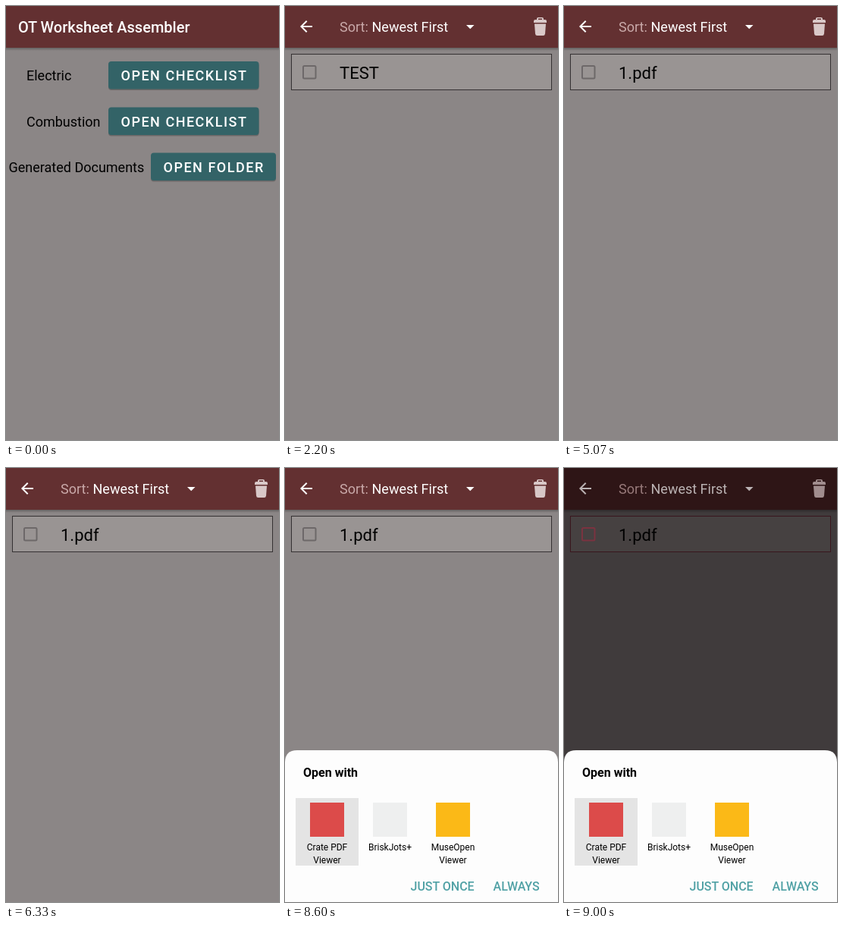
These frames come from a looping animation (360x572 px, 9.07 s). An HTML page:

```html
<!DOCTYPE html>
<html lang="en">
<head>
<meta charset="utf-8">
<title>Checklist app</title>
<style>
html, body { margin: 0; width: 100%; height: 100%; overflow: hidden; background: #8b8686; }
svg { display: block; width: 100vw; height: 100vh; font-family: Roboto, sans-serif; }

/* Every part shares one 9070 ms timeline. */
.anim { animation: 9070ms linear infinite; }
.main { animation-name: main; }
.files { animation-name: files; }
.first { animation-name: first; }
.second { animation-name: second; }
.press { animation-name: press; }
.tap { animation-name: tap; }
.row-tap { animation-name: row-tap; }
.tap, .row-tap { transform-box: fill-box; transform-origin: center; }
.scrim { animation-name: scrim; }
.light { animation-name: dim; }
.edge { stroke: var(--edge); animation-name: tint; }
.sheet { animation-name: rise; }

.title { font-size: 20px; font-weight: 500; fill: #fff; }
.label { font-size: 18px; }
.button { font-size: 18px; font-weight: 500; letter-spacing: 1.5px; fill: #fff; }
.file { font-size: 22px; }
.app { font-size: 12px; text-anchor: middle; }
.action { font-size: 16px; font-weight: 500; fill: #50a1a5; }

@keyframes main {
  0%, 15.44% { opacity: 1; }
  16.87%, 100% { opacity: 0; }
}
@keyframes files {
  0%, 15.44% { opacity: 0; }
  16.87%, 100% { opacity: 1; }
}
@keyframes first {
  0%, 52.15% { opacity: 1; }
  52.16%, 100% { opacity: 0; }
}
@keyframes second {
  0%, 52.15% { opacity: 0; }
  52.16%, 100% { opacity: 1; }
}
@keyframes press {
  0%, 11.03% { opacity: 0; }
  12.4%, 100% { opacity: .8; }
}
@keyframes tap {
  0%, 11.03% { transform: scale(0); opacity: 0; }
  11.5% { transform: scale(.2); opacity: .85; }
  13.23% { transform: scale(1); opacity: .85; }
  15.44% { transform: scale(2.4); opacity: .5; }
  16.87%, 100% { transform: scale(2.8); opacity: 0; }
}
@keyframes row-tap {
  0%, 48.51% { transform: scale(0); opacity: 0; }
  48.9% { transform: scale(.1); opacity: .16; }
  52.15% { transform: scale(1); opacity: .16; }
  55.13%, 91.18% { transform: scale(1); opacity: 0; }
  91.19% { transform: scale(0); opacity: .16; }
  93.38% { transform: scale(1); opacity: .16; }
  94.7%, 100% { transform: scale(1); opacity: 0; }
}
@keyframes scrim {
  0%, 94.82% { opacity: 0; }
  98.46%, 100% { opacity: .56; }
}
@keyframes dim {
  0%, 94.82% { opacity: 1; }
  98.46%, 100% { opacity: .68; }
}
@keyframes tint {
  0%, 94.82% { stroke: var(--edge); }
  98.46%, 100% { stroke: #7b3340; }
}
@keyframes rise {
  0%, 92.2% { transform: translateY(205px); animation-timing-function: cubic-bezier(0, 0, .2, 1); }
  94.6%, 100% { transform: translateY(0); }
}
</style>
</head>
<body>
<svg viewBox="0 0 360 572" preserveAspectRatio="none">
  <defs>
    <linearGradient id="shade" x2="0" y2="1">
      <stop stop-opacity=".28"/>
      <stop offset="1" stop-opacity="0"/>
    </linearGradient>
    <clipPath id="folderClip"><rect x="191" y="193.500" width="165" height="36.500" rx="4"/></clipPath>
    <clipPath id="rowClip"><rect x="9" y="64" width="342" height="46"/></clipPath>
    <g id="openList">
      <rect x="135" y="74.500" width="198.500" height="36.500" rx="4" opacity=".22"/>
      <rect x="135" y="73" width="198.500" height="36.500" rx="4" fill="#336367"/>
      <text class="button" x="151.500" y="98">OPEN CHECKLIST</text>
    </g>
  </defs>

  <rect width="360" height="572" fill="#8b8686"/>
  <rect y="55" width="360" height="4" fill="url(#shade)"/>
  <rect width="360" height="55" fill="#633031"/>

  <g class="anim files">
    <rect class="anim edge" style="--edge:#353132" x="8.500" y="63.500" width="343" height="47" fill="#999493"/>
    <g clip-path="url(#rowClip)">
      <circle class="anim row-tap" cx="180" cy="87" r="190"/>
    </g>
  </g>

  <rect class="anim scrim" width="360" height="572" fill="#060003"/>

  <g class="anim main">
    <text class="title" x="16" y="35">OT Worksheet Assembler</text>
    <text class="label" x="27" y="98">Electric</text>
    <use href="#openList"/>
    <text class="label" x="27" y="158.500">Combustion</text>
    <use href="#openList" y="60.500"/>
    <text class="label" x="3.500" y="219">Generated Documents</text>
    <rect x="191" y="195" width="165" height="36.500" rx="4" opacity=".22"/>
    <rect x="191" y="193.500" width="165" height="36.500" rx="4" fill="#336367"/>
    <g clip-path="url(#folderClip)">
      <rect class="anim press" x="191" y="193" width="165" height="38" fill="#727474"/>
      <circle class="anim tap" cx="262.500" cy="212" r="51" fill="#3f9da0"/>
    </g>
    <text class="button" x="207.500" y="219">OPEN FOLDER</text>
  </g>

  <g class="anim files">
    <g class="anim light" fill="#fff">
      <path transform="translate(16 15)" d="M20 11H7.830l5.590-5.590L12 4l-8 8 8 8 1.410-1.410L7.830 13H20z"/>
      <text class="label" x="72" y="34" fill="#c9a9a9">Sort:</text>
      <text class="label" x="114.500" y="34">Newest First</text>
      <path d="M239 25h10.500l-5.250 5.250z"/>
      <g fill="#d9c8c8">
        <path d="M332 18v-1q0-2 2-2h5q2 0 2 2v1h2q2 0 2 2v2h-17v-2q0-2 2-2zm2 0h5v-1.500h-5z"/>
        <path d="M329 23.500h15l-1 13q-.2 2.500-2.500 2.500h-8q-2.300 0-2.500-2.500z"/>
      </g>
    </g>
    <rect class="anim edge" style="--edge:#6d6869" x="24" y="79" width="16.500" height="16.500" rx="1.500" fill="none" stroke-width="2"/>
    <text class="file anim first" x="72" y="96">TEST</text>
    <text class="file anim second" x="72" y="96">1.pdf</text>
  </g>

  <g class="anim sheet">
    <path d="M0 572V388q0-16 16-16h328q16 0 16 16v184z" fill="#fdfdfd"/>
    <text x="24" y="407" font-size="16" font-weight="700">Open with</text>
    <rect x="14" y="435" width="83" height="89" fill="#e4e4e4"/>
    <rect x="33" y="441" width="45" height="45" fill="#dc4b4a"/>
    <rect x="116" y="441" width="45" height="45" fill="#eeefef"/>
    <rect x="199" y="441" width="45" height="45" fill="#fbb917"/>
    <g class="app">
      <text x="55.500" y="504">Crate PDF</text>
      <text x="55.500" y="520.500">Viewer</text>
      <text x="138.500" y="504">BriskJots+</text>
      <text x="221.500" y="504">MuseOpen</text>
      <text x="221.500" y="520.500">Viewer</text>
    </g>
    <text class="action" x="165.500" y="557">JUST ONCE</text>
    <text class="action" x="274.500" y="557">ALWAYS</text>
  </g>
</svg>
</body>
</html>
```
